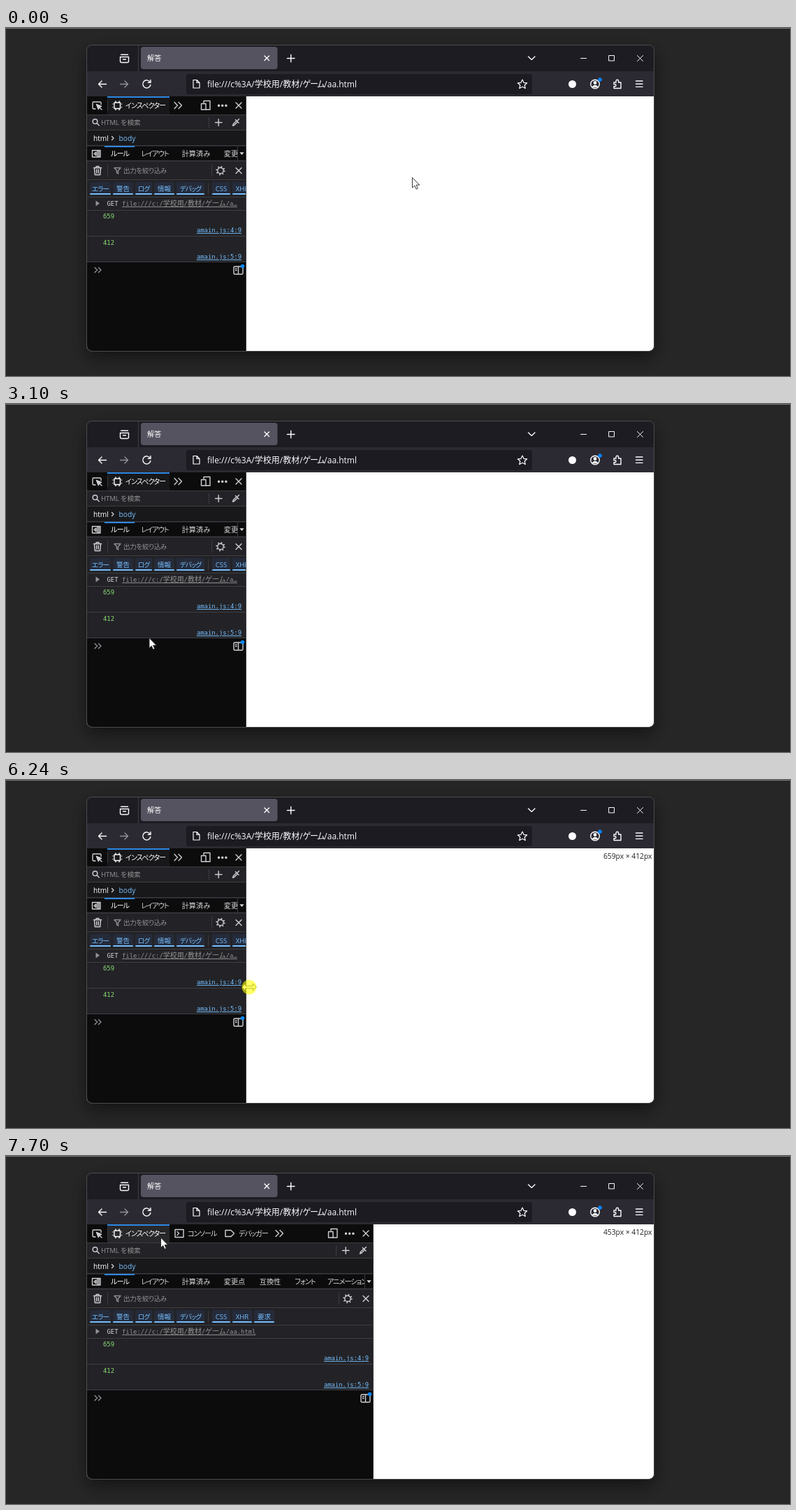
An HTML page that plays this animation: 1122 by 499 pixels, repeating every 8 s.

```html
<!DOCTYPE html>
<html lang="ja">
<head>
<meta charset="utf-8">
<style>
  html, body { margin: 0; width: 100%; height: 100%; overflow: hidden; background: #262626 }
  svg { display: block; font: 10.2px "Open Sans", "Noto Sans CJK JP", sans-serif; fill: #d7d7db }
  text { white-space: pre }
  .kana { font-feature-settings: "palt"; letter-spacing: -.1em }
  .mid text { text-anchor: middle }
  .mono { font: 8.9px "DejaVu Sans Mono", "Noto Sans CJK JP", monospace }
  .mono .cjk { font-size: 9.95px }
  .link { fill: #75bfff; text-decoration: underline; text-anchor: end }
  .icon { fill: none; stroke: #d0d0d4; stroke-width: 1.4; stroke-linecap: round; stroke-linejoin: round }
  .light { stroke: #fbfbfe }
  .dim { stroke: #8f8f96 }
  .rule { stroke: #3c3c41; fill: none }
</style>
</head>
<body>
<svg width="1122" height="499" viewBox="0 0 1122 499">
  <defs>
    <clipPath id="frame"><rect x="116" y="25" width="811.5" height="438" rx="7"/></clipPath>
    <clipPath id="panel"><rect id="panelBox" x="116" y="98" width="228" height="365"/></clipPath>
    <filter id="shadow" x="-10%" y="-10%" width="120%" height="125%">
      <feDropShadow dx="0" dy="9" stdDeviation="12" flood-color="#000" flood-opacity=".5"/>
    </filter>
  </defs>
  <rect width="1122" height="499" fill="#262626"/>
  <rect width="1122" height="1" fill="#777"/>
  <rect x="116" y="25" width="811.5" height="438" rx="7" fill="#1c1b22" filter="url(#shadow)"/>

  <g clip-path="url(#frame)">
    <!-- tab strip and toolbar -->
    <rect x="116" y="62" width="812" height="36" fill="#2b2a33"/>
    <path class="rule" d="M189.5 25V62"/>
    <rect x="193" y="27" width="195.5" height="32" rx="4" fill="#54535f"/>
    <rect id="burst" x="193" y="27" width="0" height="32" rx="3" fill="#0a84ff"/>
    <text x="202" y="47" fill="#fbfbfe">解答</text>
    <rect x="258" y="66" width="495" height="29" rx="4" fill="#1c1b22"/>
    <text x="288" y="85" font-size="12" fill="#fbfbfe">file:///c%3A/学校用/教材/<tspan class="kana">ゲーム</tspan>/aa.html</text>
    <g class="icon light">
      <path d="M163.5 41.5h12v6q0 2-2 2h-8q-2 0-2-2zM164.500 38.300h10M167.500 45h4"/>
      <path d="M370 40l6.500 6.500m0-6.500l-6.500 6.500M402.500 43.500h10.500m-5.250-5.250v10.500M747.500 41l4.700 4.500 4.700-4.500"/>
      <path stroke-width="1" d="M822.500 43.500h8M863 39.500h7.500v7.500h-7.500zM903.500 39.500l8 8m0-8l-8 8"/>
      <path d="M143.500 80.500h-11m4.500-4.500l-4.500 4.500 4.500 4.500"/>
      <path d="M206.200 77.500a5.600 5.600 0 1 0 .7 4M207 74.500v3.700h-3.700"/>
      <path d="M268 74.500h5l4 4v7.500h-9zM273 74.500v4h4" stroke-width="1.200"/>
      <path d="M739 74l2 4.300 4.700.5-3.500 3.200 1 4.600-4.200-2.400-4.200 2.400 1-4.600-3.500-3.200 4.700-.5z" stroke-width="1.200"/>
      <circle cx="843" cy="80.500" r="6.300"/>
      <path d="M839.300 84.500q3.700-4 7.400 0z" fill="#fbfbfe"/>
      <circle cx="843" cy="78.500" r="1.700" fill="#fbfbfe"/>
      <path d="M870 78h3v-2a1.800 1.800 0 0 1 3.600 0v2h3.400v8.500h-10v-2.700h1.500a1.500 1.500 0 0 0 0-3h-1.500z"/>
      <path d="M901.500 76h9.500m-9.500 4.200h9.500m-9.500 4.200h9.500"/>
    </g>
    <path class="icon dim" d="M163.500 80.500h11m-4.500-4.500l4.500 4.500-4.500 4.500"/>
    <circle cx="810.500" cy="80.500" r="5.500" fill="#fbfbfe"/>
    <circle cx="850" cy="74" r="2.800" fill="#0a84ff"/>

    <!-- page -->
    <rect x="116" y="98" width="812" height="365" fill="#fff"/>
    <text id="size" y="113" font-size="10.3" fill="#222" text-anchor="end"/>

    <!-- developer tools -->
    <g clip-path="url(#panel)">
      <rect x="116" y="98" width="812" height="365" fill="#0c0c0d"/>
      <rect x="145" y="98" width="89" height="26" id="hover" fill="#18181a"/>
      <rect x="145" y="98" width="89" height="2" fill="#2b87e3"/>
      <path class="rule" d="M145.500 103V119"/>
      <g class="icon">
        <path d="M128 116h-2.500q-1.500 0-1.500-1.500v-7q0-1.500 1.500-1.500h9q1.500 0 1.500 1.500v2"/>
        <path d="M129.500 109.500l7 2.800-3 1.200-1.200 3z" fill="#d0d0d4"/><path d="M134 114l3 3"/>
        <path class="light" d="M155 107h8.500v8.500h-8.500zM157 105v2m5-2v2m-5 8.500v2m5-2v2M153 109v0m0 4.500v0m12.500-4.500v0m0 4.500v0"/>
      </g>
      <text class="kana" x="171" y="115" fill="#fff">インスペクター</text>
      <g id="tabConsole">
        <path class="icon" d="M242 105.500h12v11h-12zM245 108.500l2.500 2.500-2.500 2.500"/>
        <text class="kana" x="260" y="115">コンソール</text>
      </g>
      <g id="tabDebugger">
        <path id="debuggerIcon" class="icon" d="M314 106.500h8l4.500 4.500-4.500 4.500h-8z"/>
        <text class="kana" x="333" y="115">デバッガー</text>
      </g>
      <path id="more" class="icon" d="M-5-4.500l4.500 4.500-4.500 4.500M1-4.500l4.500 4.500L1 4.500"/>

      <rect x="116" y="124" width="812" height="44" fill="#18181a"/>
      <rect x="116" y="124" width="812" height="22" fill="#232327"/>
      <path class="rule" d="M116 124.500H928M116 146.500H928"/>
      <g class="icon"><circle cx="127.500" cy="134" r="3.300"/><path d="M130 136.500l3.200 3.200"/></g>
      <text x="136" y="139" font-size="9.6" fill="#939395" letter-spacing="-.1">HTML を検索</text>
      <text x="125" y="162" fill="#fff">html</text>
      <path class="icon" stroke-width="1.100" d="M151.500 155.500l2.500 2.500-2.500 2.500"/>
      <text x="161.500" y="162" fill="#75bfff">body</text>

      <path class="rule" stroke-width="1.500" stroke="#58585c" d="M116 168.800H928"/>
      <rect x="141" y="169" width="43" height="2" fill="#2b87e3"/>
      <path class="icon" stroke-width="1.100" d="M123.500 175.500h11.500v9.500h-11.500zM131 175.500v9.500M133 175.500v9.500M129 178l-3 2.300 3 2.300z"/>
      <g class="mid">
        <text class="kana" x="163" y="184" fill="#fff">ルール</text>
        <text class="kana" x="213" y="184">レイアウト</text>
        <text x="272" y="184">計算済み</text>
        <text x="327" y="184">変更点</text>
        <text x="378" y="184">互換性</text>
        <text class="kana" x="428" y="184">フォント</text>
        <text class="kana" x="488" y="184">アニメーション</text>
      </g>

      <rect x="116" y="191" width="812" height="52" fill="#232327"/>
      <path class="rule" d="M116 190.500H928" stroke="#58585c" stroke-width="1.500"/>
      <path class="rule" d="M116 217.500H928M145.500 196V213M116 242.500H928"/>
      <path class="icon" d="M125.500 200.500h11M129 200v-1.500h4v1.500M126.500 201l.8 9.500h7.400l.8-9.500M129.700 203v5m2.600-5v5"/>
      <path class="icon dim" stroke-width="1.100" d="M155 200.500h9l-3.500 4v4.500l-2-1.500v-3z"/>
      <text x="168" y="208" font-size="9.6" fill="#939395" class="kana" style="letter-spacing:-.04em">出力を絞り込み</text>
      <g id="filters" class="mid"></g>
      <path class="rule" d="M289.500 222V238"/>

      <g id="logs">
        <rect x="116" y="243" width="812" height="93" fill="#232327"/>
        <path class="rule" d="M116 261.500H928M116 298.500H928M116 335.500H928"/>
        <path d="M128.500 247.500v8l5.500-4z" fill="#939395"/>
        <g class="mono">
          <text x="144.500" y="255">GET</text>
          <text x="166" y="255" fill="#939395" text-decoration="underline">file:///c:/<tspan class="cjk">学校用</tspan>/<tspan class="cjk">教材</tspan>/<tspan class="cjk">ゲーム</tspan>/<tspan id="fileName"></tspan></text>
          <text x="139" y="273" fill="#86de74">659</text>
          <text x="139" y="311" fill="#86de74">412</text>
          <g class="right">
            <text class="link" x="337" y="293">amain.js:4:9</text>
            <text class="link" x="337" y="331">amain.js:5:9</text>
          </g>
        </g>
      </g>
      <g id="prompt">
        <path class="icon dim" d="M127 343.500l3.500 3.500-3.500 3.500M132.500 343.500l3.500 3.500-3.500 3.500"/>
        <g class="right">
          <path class="icon" d="M327.500 342h10q1.500 0 1.500 1.500v8q0 1.500-1.500 1.500h-10q-1.500 0-1.500-1.500v-8q0-1.500 1.500-1.500zM332.500 342v11M328.500 345h1.500m-1.500 2.500h1.500"/>
          <circle cx="338.500" cy="341.500" r="2.800" fill="#0a84ff"/>
        </g>
      </g>

      <g class="right">
        <path class="icon" d="M283 107v-2.500h9v12.500h-5M279.500 108.500h6.500v8.500h-6.500z"/>
        <path d="M303 109.700h3v3h-3zM308.200 109.700h3v3h-3zM313.400 109.700h3v3h-3z"/>
        <path class="icon" d="M329 107l8 8m0-8l-8 8M299.500 135.500h9.500m-4.750-4.750v9.500"/>
        <path class="icon" d="M324.500 140l1-2.500 4.500-4.500 1.500 1.500-4.500 4.500zM328.500 131.500l4.500 4.500M331 133l2.500-2.500"/>
        <path class="rule" d="M290.500 128V143M294.500 196V213"/>
        <rect x="331" y="172" width="13" height="17" fill="#0c0c0d"/>
        <path class="rule" d="M331.500 170V190"/>
        <path d="M334.300 178.300h6.400l-3.200 3.700z"/>
        <g class="icon">
          <circle cx="307" cy="204.500" r="4.200"/>
          <circle cx="307" cy="204.500" r="5.700" stroke-width="2" stroke-dasharray="1.500 2.977" stroke-linecap="butt"/>
          <path d="M329 200.500l8 8m0-8l-8 8"/>
        </g>
        <path class="rule" d="M343.500 98V463"/>
      </g>
    </g>
  </g>
  <rect x="115.500" y="24.500" width="812" height="439" rx="7.500" fill="none" stroke="#4b4b4e"/>

  <path id="arrow" d="M0 0V14.500L3.300 11.500 5.600 16.500 7.800 15.500 5.600 10.600H10.300Z" fill="#fff" stroke="#222" stroke-width=".9"/>
  <g id="resize">
    <path d="M-10.300 0l5-5v3.300h10.600v-3.300l5 5-5 5v-3.300h-10.600v3.300z" fill="#fff" stroke="#333" stroke-width=".8"/>
    <circle id="press" r="10.500" fill="#ff0" fill-opacity=".6"/>
  </g>
</svg>
<script>
const $ = id => document.getElementById(id);
const LOOP = 8000, SPLIT = 344;

// label, left, right
const filters = [
  ['エラー', 120, 150], ['警告', 153, 182], ['ログ', 185, 209], ['情報', 212, 241],
  ['デバッグ', 244, 284], ['CSS', 295, 321], ['XHR', 324, 352], ['要求', 355, 384]
];
$('filters').innerHTML = filters.map(([label, l, r]) => `
  <rect x="${l}" y="221" width="${r - l}" height="18" rx="2" fill="#252b3a"/>
  <rect x="${l}" y="237" width="${r - l}" height="2" rx="1" fill="#75bfff"/>
  <text x="${(l + r) / 2}" y="233.500" font-size="9.6" fill="#75bfff"
    class="${/[ァ-ン]/.test(label) ? 'kana' : ''}">${label}</text>`).join('');

// bursts of screen updates: start, end, number of updates
const bursts = [
  [850, 1060, 4], [1330, 2070, 12], [2140, 2690, 9], [2960, 3240, 5], [3500, 4270, 11],
  [4340, 4460, 3], [4740, 5220, 8], [5420, 6040, 10], [6240, 6870, 10], [6970, 7000, 2], [7190, 7700, 8]
];
// time, x, y
const pointer = [
  [0, 581.5, 214.5], [780, 581.5, 214.5], [920, 400, 280], [1060, 124, 347],
  [1330, 120, 344], [1530, 101, 300], [1700, 135, 276], [1870, 160, 292], [2070, 140, 317],
  [2300, 121, 331], [2500, 150, 322], [2690, 128, 330],
  [2960, 123, 338], [3240, 287, 333],
  [3500, 296, 330], [3850, 360, 308], [4190, 397.5, 293.5], [4200, 397.5, 293.5], [4270, 393, 296],
  [4460, 386.5, 302], [5400, 386.5, 302], [5833, 352, 301], [5900, 346, 299.5], [6040, 345, 299.5],
  [6240, 348, 297], [6520, 411, 283], [6590, 426, 280], [6870, 524, 274.5], [6970, 526, 274],
  [7000, 525.5, 274], [7190, 505, 262], [7480, 300, 150], [7700, 221.5, 117]
];
const divider = [[6240, SPLIT], [6310, 348], [6590, 411], [6870, 515], [6970, 524], [7000, 526]];

function held(t) {
  let time = 0;
  for (const [start, end, n] of bursts) {
    if (t < start) break;
    const step = (end - start) / (n - 1);
    time = start + step * Math.min(n - 1, Math.floor((t - start) / step + .1));
  }
  return time;
}

function sample(keys, t) {
  const i = keys.findIndex(k => k[0] > t);
  if (i === 0) return keys[0].slice(1);
  if (i < 0) return keys[keys.length - 1].slice(1);
  const a = keys[i - 1], b = keys[i], u = (t - a[0]) / (b[0] - a[0]);
  return a.slice(1).map((v, j) => v + (b[j + 1] - v) * u);
}

const show = (id, on) => $(id).style.display = on ? '' : 'none';
const move = (el, x, y = 0) => el.setAttribute('transform', `translate(${x} ${y})`);

function draw() {
  const t = held(performance.now() % LOOP);
  const [x, y] = sample(pointer, t);
  const split = Math.round(sample(divider, t)[0]);
  const dragging = t >= 6240 && t < 7190;
  const resizing = t >= 5850 && t < 7190;

  $('panelBox').setAttribute('width', split - 116);
  document.querySelectorAll('.right').forEach(el => move(el, split - SPLIT));

  const wide = split > 395, wider = split > 470;
  show('tabConsole', wide);
  show('tabDebugger', wider);
  show('debuggerIcon', t >= 7000);
  move($('more'), wider ? 391 : wide ? 318 : 246, 111);
  const room = 1 + Math.floor((split - SPLIT) / 5.35);
  $('fileName').textContent = room < 6 ? 'aa.html'.slice(0, room) + '…' : 'aa.html';
  $('hover').setAttribute('fill', x > 145 && x < 234 && y > 98 && y < 124 ? '#28282b' : '#18181a');

  // the page lags slightly behind the divider late in the drag
  const lag = t >= 6870 && t < 7000 ? 1.6 : 0;
  show('size', t >= 6240);
  $('size').setAttribute('x', 924.5 + lag);
  $('size').textContent = `${Math.round((927.6 - split + lag) / .8862)}px × 412px`;

  // reload: cleared console, then a glow sweeping the tab
  const cleared = t >= 4740 && t < 4870;
  show('logs', !cleared);
  move($('prompt'), 0, cleared ? -93 : 0);
  const p = (t - 4877) / 343, glowing = p >= 0 && p < 1;
  $('burst').setAttribute('width', glowing ? 196 * Math.min(1, 3.3 * p) : 0);
  $('burst').setAttribute('opacity', .25 * (1 - p));

  show('arrow', !resizing);
  show('resize', resizing);
  show('press', dragging);
  move($('arrow'), x, y);
  move($('resize'), x, y);
  requestAnimationFrame(draw);
}
draw();
</script>
</body>
</html>
```
